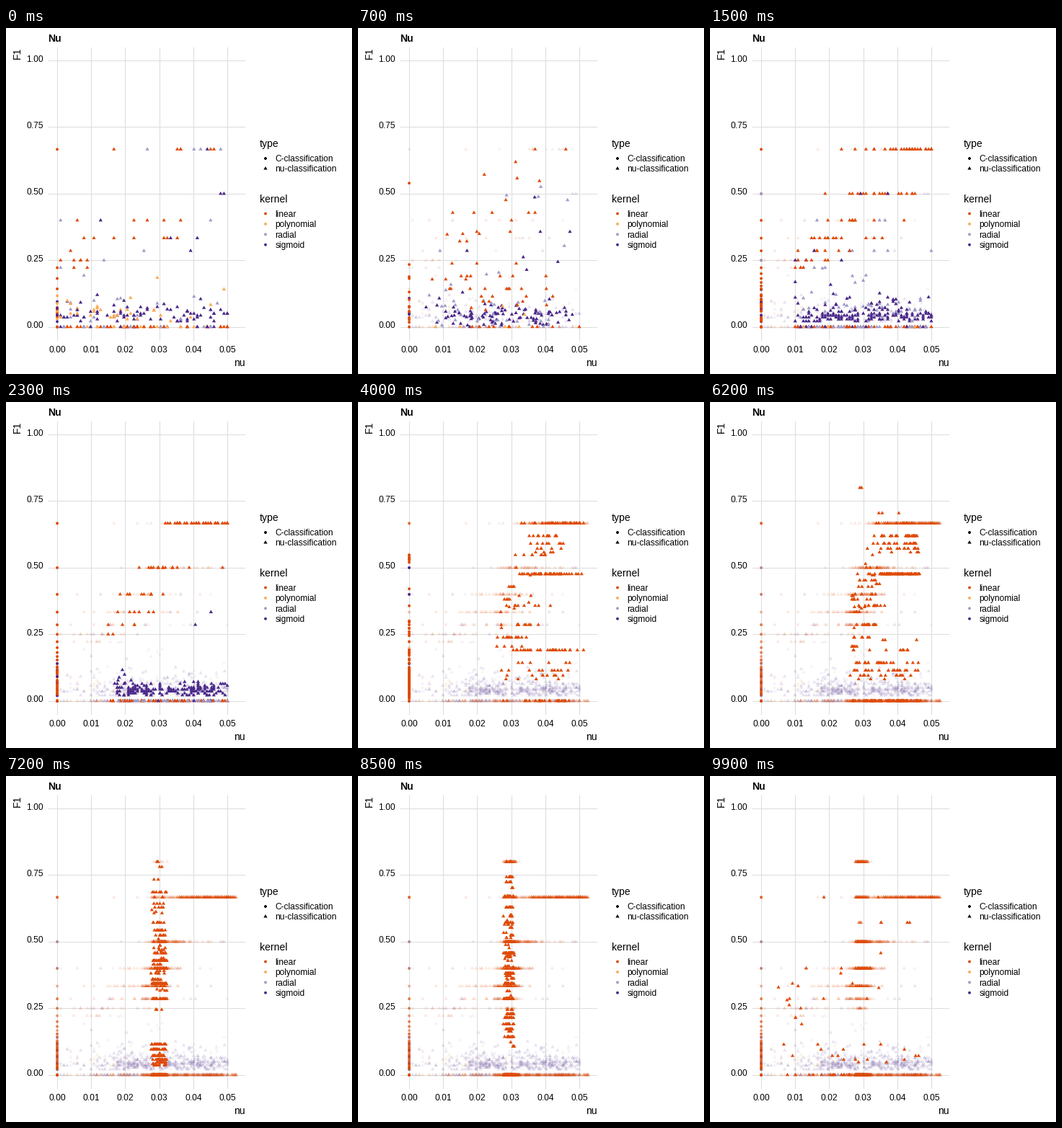
Animation, 480 px wide and 480 px high, one loop 10 s. Source, as a matplotlib script:

```python
import numpy as np
import matplotlib.pyplot as plt
from matplotlib.animation import FuncAnimation
from matplotlib.collections import PathCollection
from matplotlib.colors import to_rgba
from matplotlib.path import Path
from matplotlib.transforms import IdentityTransform

SIZE, DPI = 480, 72
FRAMES, PERIOD, MOVE = 100, 11, 6
SHADOW = 0.12
plt.rcParams["font.family"] = "Liberation Sans"
rng = np.random.default_rng(8)

KERNELS = {"linear": "#DF4B08", "polynomial": "#FDAA51",
           "radial": "#A09BC9", "sigmoid": "#4A2889"}
LIN, POLY, RAD, SIG = range(4)
RGBA = np.array([to_rgba(c) for c in KERNELS.values()])
LEVELS = 2 / np.array([9, 8, 7, 6, 5, 4, 3])  # usual F1 scores, rising

R = 1.95
DOT = Path.circle((0, 0), R)
TRI = Path(R * np.array([(0, 1.555), (1.347, -0.778), (-1.347, -0.778), (0, 1.555)]))


def px(nu):
    return 71 + 4720 * np.asarray(nu)


def py(f1):
    return 414.7 - 369.6 * np.asarray(f1)


# A row is (kernel, is C-classification, nu, F1).
def nu_rows(kernel, nu, f1):
    return [(kernel, 0, a, b) for a, b in zip(nu, f1)]


def c_rows(kernel, f1):
    return [(kernel, 1, 0.0, b) for b in f1]


def grid(n, lo, hi):
    """Random picks from 51 evenly spaced nu values."""
    return lo + (hi - lo) * rng.integers(0, 51, n) / 50


def zeros(kernel, n, lo, hi):
    return nu_rows(kernel, grid(n, lo, hi), np.zeros(n))


def cloud(kernel, n, lo, hi):
    f1 = np.clip(rng.normal(0.042, 0.013, n), 0.022, 0.075)
    return nu_rows(kernel, grid(n, lo, hi), np.round(f1 * 140) / 140)


def tail(kernel, n, lo, hi, scale=0.04):
    f1 = np.minimum(0.06 + rng.exponential(scale, n), 0.22)
    return nu_rows(kernel, grid(n, lo, hi), f1)


def climb(kernel, n, lo, hi, mid, slope, dev, zero=0.0):
    """Levels that rise with nu, reaching 1/3 at mid, mixed with zeros."""
    nu = grid(n, lo, hi)
    i = np.round(3 + slope * (nu - mid) + rng.normal(0, dev, n))
    f1 = LEVELS[np.clip(i, 0, 6).astype(int)]
    return nu_rows(kernel, nu, np.where(rng.random(n) < zero, 0, f1))


def pick(n, lo, hi, weights):
    w = np.array(list(weights.values()))
    f1 = rng.choice(list(weights), n, p=w / w.sum())
    return nu_rows(LIN, rng.uniform(lo, hi, n), f1)


def column(n, low):
    """C-classification scores: harmonic levels above a crowded foot."""
    return (c_rows(LIN, 2 / rng.integers(3, 15, n))
            + c_rows(LIN, rng.uniform(0.02, 0.13, low)) + c_rows(LIN, [0] * 8)
            + c_rows(SIG, np.linspace(0.02, 0.14, 6)))


def shuffled(rows):
    return [rows[i] for i in rng.permutation(len(rows))]


def first_state():
    g = (0.001, 0.05)
    return shuffled(
        zeros(POLY, 20, *g) + zeros(RAD, 18, *g) + zeros(SIG, 20, *g)
        + climb(LIN, 62, *g, 0.018, 120, 1.2, zero=0.55)
        + climb(RAD, 9, *g, 0.022, 100, 1.5) + climb(SIG, 7, *g, 0.03, 80, 1.5)
        + tail(POLY, 12, *g) + tail(RAD, 10, *g) + tail(SIG, 16, *g, 0.03)
        + cloud(POLY, 18, *g) + cloud(RAD, 5, *g) + cloud(SIG, 60, *g)
        + c_rows(POLY, np.linspace(0.03, 0.117, 4))
        + c_rows(SIG, np.linspace(0.02, 0.095, 4))
        + c_rows(LIN, 2 / np.array([3, 9, 11, 14]))
        + c_rows(LIN, np.linspace(0.038, 0.073, 7)) + c_rows(LIN, [0] * 3))


def second_state():
    g = (0.01, 0.05)
    return shuffled(
        zeros(RAD, 40, *g) + zeros(POLY, 6, *g) + zeros(SIG, 22, *g)
        + climb(LIN, 132, *g, 0.02, 150, 1, zero=0.33)
        + climb(RAD, 13, *g, 0.03, 60, 2.2) + climb(SIG, 7, *g, 0.025, 120, 1)
        + tail(RAD, 34, *g) + tail(SIG, 28, *g)
        + cloud(SIG, 135, *g) + cloud(RAD, 18, *g)
        + c_rows(RAD, [0.5, 0.25, 0.08])
        + c_rows(LIN, 2 / np.arange(3, 15)) + column(0, 26))


def third_state():
    g = (0.015, 0.05)
    return shuffled(
        zeros(SIG, 12, *g) + zeros(POLY, 4, *g) + zeros(RAD, 55, 0.018, 0.05)
        + climb(LIN, 135, *g, 0.019, 160, 0.9, zero=0.35)
        + climb(SIG, 2, 0.04, 0.05, 0.05, 150, 0.8)
        + tail(SIG, 7, 0.015, 0.023, 0.02) + cloud(SIG, 155, 0.017, 0.05)
        + c_rows(LIN, 2 / np.arange(3, 14)) + column(0, 26))


def later_states():
    wide = (0.025, 0.0525)
    rise = dict(mid=0.027, slope=300, dev=0.8, zero=0.38)
    peak = nu_rows(LIN, [0.029, 0.0295], [0.8, 0.8])
    blip = nu_rows(LIN, np.linspace(0.0286, 0.0295, 9), [4 / 7] * 9)
    mid = {0: 45, 0.8: 1.5, 2 / 3: 8, 0.5: 17, 0.4: 13, 1 / 3: 10, 2 / 7: 5}
    late = {0: 40, 0.8: 15, 2 / 3: 12, 0.5: 13, 0.4: 10, 1 / 3: 6,
            2 / 7: 3, 0.25: 3}
    top = c_rows(SIG, [0.5, 0.4])
    return [climb(LIN, 250, *wide, **rise) + column(26, 45) + top,
            climb(LIN, 270, *wide, **rise) + column(34, 60) + top,
            peak + climb(LIN, 380, *wide, **rise),
            peak + pick(400, 0.0275, 0.0325, mid),
            pick(400, 0.0276, 0.0315, late) + blip,
            pick(350, 0.0277, 0.0305, late) + blip]


STATES = [first_state(), second_state(), third_state()] + later_states()


def split(rows):
    """Positions of each kernel and type pair, in row order."""
    parts = {}
    for kernel, is_c, nu, f1 in rows:
        parts.setdefault((kernel, is_c), []).append((px(nu), py(f1)))
    return {k: np.array(v) for k, v in parts.items()}


def rest(rows):
    return [r[:2] for r in rows], np.array([(px(r[2]), py(r[3])) for r in rows])


PARTS = [split(s) for s in STATES]
RESTS = [rest(s) for s in STATES]


def between(a, b, p):
    """Pair points of the same group; unpaired ones are dropped."""
    keys, spots = [], []
    for key in sorted(a.keys() & b.keys(), reverse=True):
        n = min(len(a[key]), len(b[key]))
        keys += [key] * n
        spots.append(a[key][:n] * (1 - p) + b[key][:n] * p)
    return keys, np.concatenate(spots)


fig = plt.figure(figsize=(SIZE / DPI, SIZE / DPI), dpi=DPI, facecolor="white")
ax = fig.add_axes([0, 0, 1, 1])
ax.set(xlim=(0, SIZE), ylim=(SIZE, 0))
ax.axis("off")


def look(keys):
    return [DOT if c else TRI for _, c in keys], RGBA[[k for k, _ in keys]]


def stamp(paths, spots, colors, z):
    """Markers sized in pixels, placed in stage coordinates."""
    c = PathCollection(paths, offsets=spots, offset_transform=ax.transData,
                       transform=IdentityTransform(), facecolors=colors,
                       edgecolors="none", linewidths=0, zorder=z)
    return ax.add_collection(c, autolim=False)


def marks(keys, spots, z, alpha=1):
    paths, colors = look(keys)
    return stamp(paths, spots, colors * [1, 1, 1, alpha], z)


def label(x, y, s, size=12, **kw):
    ax.text(x, y, s, fontsize=size, va="baseline", **kw)


def draw_panel():
    line = dict(color="#DEDEDE", lw=1.1, zorder=0)
    for v in np.arange(5) / 4:
        ax.plot([58.6, 331.4], [py(v)] * 2, **line)
        label(52, py(v) + 1.6, f"{v:.2f}", ha="right")
    for v in np.arange(6) / 100:
        ax.plot([px(v)] * 2, [26.6, 433.2], **line)
        label(px(v), 449.6, f"{v:.2f}", ha="center")
    label(58.6, 19, "Nu", 14, weight="bold")
    label(331.4, 469, "nu", 14, ha="right")
    ax.text(22.5, 26.5, "F1", fontsize=14, rotation=90, ha="right", va="top")


def draw_legend():
    label(352, 165, "type", 14)
    label(352, 242, "kernel", 14)
    for y, path, name in ((181, DOT, "C-classification"),
                          (195, TRI, "nu-classification")):
        stamp([path], [(360, y)], "black", 2)
        label(373.3, y + 4.3, name)
    for i, name in enumerate(KERNELS):
        y = 257.5 + 14.4 * i
        marks([(i, 1)], [(360, y)], 2)
        label(373.3, y + 4.3, name)


draw_panel()
draw_legend()
shadows = [marks(k, s, 1, SHADOW) for k, s in RESTS]
live = marks(*RESTS[0], 2)


def update(frame):
    k, r = divmod(frame + PERIOD - MOVE, PERIOD)
    for j, s in enumerate(shadows):
        s.set_visible(j < k)
    if k > 0 and r < MOVE:
        keys, spots = between(PARTS[k - 1], PARTS[k % len(PARTS)],
                              (r + 1) / (MOVE + 1))
    else:
        keys, spots = RESTS[k]
    paths, colors = look(keys)
    live.set_paths(paths)
    live.set_offsets(spots)
    live.set_facecolor(colors)
    return [live, *shadows]


anim = FuncAnimation(fig, update, frames=FRAMES, interval=100, repeat=True,
                     repeat_delay=0, blit=False)
plt.show()
```
